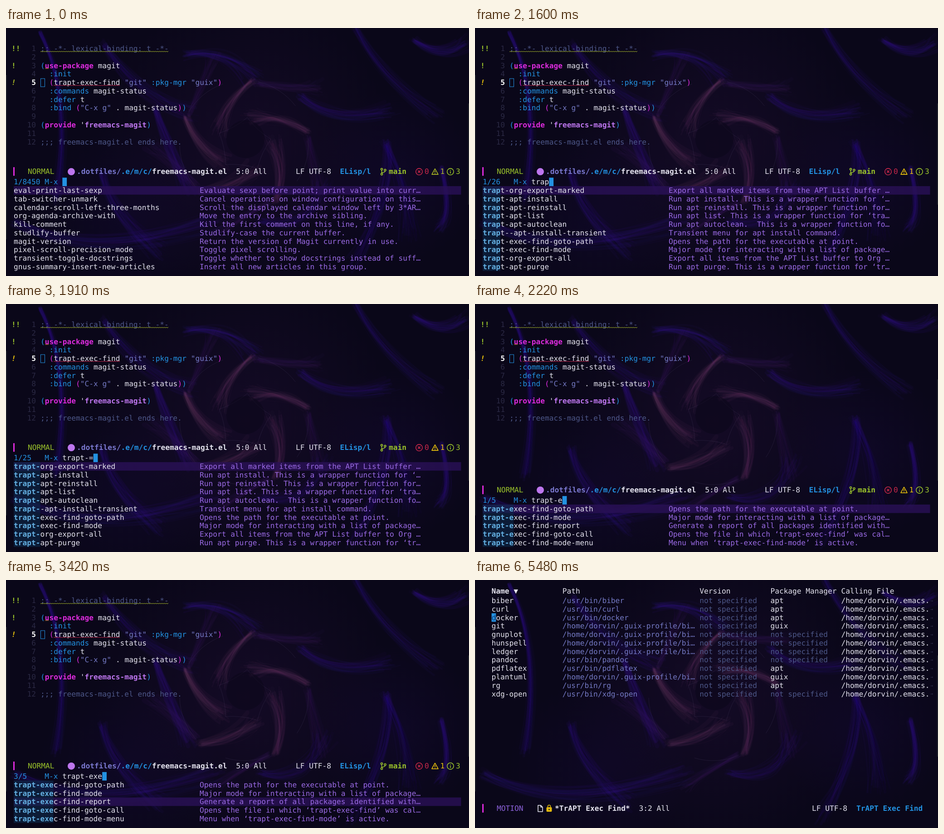
An HTML page with a canvas for the animation above (8000 ms loop, 1021 by 549 pixels).

```html
<!DOCTYPE html>
<html lang="en">
<head>
<meta charset="utf-8">
<title>Package command session</title>
<style>
html, body { margin: 0; width: 100%; height: 100%; overflow: hidden; background: #0a0719; }
canvas, svg { position: absolute; left: 0; top: 0; width: 1021px; height: 549px; }
text { font: 16.21px "DejaVu Sans Mono", monospace; white-space: pre; text-rendering: geometricPrecision; fill: #e4e3ee; }
.bold, .key, .sym, .hit, .dir, .mode, .cur, .mark, .warn { font-weight: bold; }
.blue, .mode, .tail { fill: #2392e2; }
.mode { fill: #2392e2; }
.pink, .key { fill: #dc2bdd; }
.str { fill: #7479c4; }
.dir { fill: #7a78cf; }
.dim { fill: #4d5788; }
.num { fill: #2b2944; }
.cur { fill: #ffffff; }
.sym { fill: #bd76ee; }
.desc { fill: #9a6ae4; }
.hit { fill: #64b0e2; }
.green, .mark { fill: #9cc42b; }
.red { fill: #c9284a; }
.motion { fill: #8d63dc; }
.under { fill: #123c78; }
.arrow { font-size: 10px; fill: #34334f; }
</style>
</head>
<body>
<canvas id="wall" width="1021" height="549"></canvas>
<svg id="screen" viewBox="0 0 1021 549"></svg>
<script>
const COL = 9.76, ROW = 18.77, LOOP = 8000;
const LEFT = 17, CODE = 76, TOP = 45.5;
const screen = document.getElementById('screen');

// ---------- wallpaper: bundles of faint curved strands ----------
function paintWall() {
  const g = document.getElementById('wall').getContext('2d');
  let seed = 11;
  const rnd = () => (seed = (seed * 16807) % 2147483647) / 2147483647;
  const jitter = n => (rnd() + rnd() - 1) * n;

  function glow(x, y, r, rgb, alpha) {
    const grad = g.createRadialGradient(x, y, 0, x, y, r);
    grad.addColorStop(0, `rgba(${rgb},${alpha})`);
    grad.addColorStop(1, `rgba(${rgb},0)`);
    g.fillStyle = grad;
    g.fillRect(0, 0, 1021, 549);
  }

  function bundle(x0, y0, cx, cy, x1, y1, spread, count, rgb) {
    for (let i = 0; i < count; i++) {
      g.strokeStyle = `rgba(${rgb},${0.025 + rnd() * 0.05})`;
      g.lineWidth = 0.8 + rnd() * rnd() * 10;
      g.beginPath();
      g.moveTo(x0 + jitter(spread * .4), y0 + jitter(spread * .4));
      g.quadraticCurveTo(cx + jitter(spread), cy + jitter(spread), x1 + jitter(spread), y1 + jitter(spread));
      g.stroke();
    }
  }

  g.fillStyle = '#0a0719';
  g.fillRect(0, 0, 1021, 549);
  g.lineCap = 'round';
  glow(525, 260, 330, '36,16,58', .38);
  glow(860, 330, 190, '30,10,80', .22);
  glow(270, 420, 200, '30,10,80', .2);

  const violet = '58,24,150', brown = '110,62,104';
  [
    [212, 320, 230, 410, 335, 492, 28],
    [20, 430, 190, 520, 460, 425, 34],
    [75, 10, 150, 150, 110, 380, 14],
    [215, 35, 290, 150, 405, 190, 30],
    [840, 255, 850, 370, 770, 520, 26],
    [835, 255, 890, 350, 890, 460, 28],
    [770, 0, 830, 110, 945, 190, 24],
    [900, 30, 965, 70, 1010, 30, 24],
    [650, 150, 720, 215, 840, 180, 30],
    [560, 430, 670, 450, 700, 345, 34],
    [400, 60, 480, 40, 545, 110, 30],
    [330, 180, 360, 270, 400, 350, 26],
    [960, 310, 985, 410, 955, 440, 18]
  ].forEach(b => bundle(...b, 34, violet));

  const polar = (r, a) => [525 + r * Math.cos(a), 258 + r * Math.sin(a)];
  for (let k = 0; k < 5; k++) {
    const a = k * Math.PI * .4 - 1.45;
    bundle(...polar(142, a), ...polar(105, a - .5), ...polar(62, a - 1.15), 24, 40, brown);
    bundle(...polar(140, a + .1), ...polar(165, a + .6), ...polar(205, a + .8), 24, 24, '72,34,110');
    g.strokeStyle = 'rgba(92,80,120,.22)';
    g.lineWidth = 1;
    g.beginPath();
    g.arc(525, 258, 142, a + .1, a + .8);
    g.stroke();
    g.beginPath();
    g.moveTo(...polar(60, a));
    g.quadraticCurveTo(...polar(42, a + .6), ...polar(60, a + 1.25));
    g.stroke();
  }
  g.fillStyle = 'rgba(10,7,25,.5)';
  g.beginPath();
  g.arc(528, 246, 42, 0, 7);
  g.fill();
}

// ---------- drawing helpers ----------
const rect = (x, y, w, h, attrs) => `<rect x="${x}" y="${y}" width="${w}" height="${h}" ${attrs}/>`;
const text = (x, mid, str, cls = '') => `<text x="${x}" y="${mid + 5.6}" class="${cls}">${str}</text>`;
const block = (x, mid) => rect(x, mid - 9.4, COL, ROW, 'fill="#2392e2"');

// Parts are [text, class] pairs laid out on the character grid.
function line(x, mid, parts) {
  let col = 0;
  return parts.map(([str, cls]) => {
    const out = str.trim() ? text(x + col * COL, mid, str, cls) : '';
    col += str.length;
    return out;
  }).join('');
}

function wave(x0, x1, y, color) {
  let d = `M${x0} ${y}`;
  for (let x = x0 + 2, up = true; x <= x1; x += 2, up = !up) d += `L${x} ${y + (up ? -1.8 : 0)}`;
  return `<path d="${d}" fill="none" stroke="${color}" stroke-width="1"/>`;
}

const edges = rect(0, 104, 2, 364, 'fill="#20212b"') + rect(1019, 167, 2, 224, 'fill="#20212b"');
const bar = mid => rect(16, mid - 9.5, 3, 19, 'fill="#dc2bdd"');
const icon = (x, y, color, body) =>
  `<g transform="translate(${x} ${y})" fill="none" stroke="${color}" stroke-width="1.6">${body}</g>`;

// ---------- code buffer ----------
const source = [
  [[';; -*- lexical-binding: t -*-', 'dim']],
  [],
  [['(', 'blue'], ['use-package', 'key'], [' magit']],
  [['  '], [':init', 'blue']],
  [['  '], ['(', 'pink'], ['trapt-exec-find'], [' '], ['"git"', 'str'], [' '], [':pkg-mgr', 'blue'], [' '], ['"guix"', 'str'], [')', 'pink']],
  [['  '], [':commands', 'blue'], [' magit-status']],
  [['  '], [':defer', 'blue'], [' t']],
  [['  '], [':bind', 'blue'], [' '], ['(', 'pink'], ['"C-x g"', 'str'], [' . magit-status'], [')', 'pink'], [')', 'blue']],
  [],
  [['(', 'blue'], ['provide', 'key'], [" '"], ['freemacs-magit', 'sym'], [')', 'blue']],
  [],
  [[';;; freemacs-magit.el ends here.', 'dim']]
];

function codeBuffer(warn) {
  const rows = source.map((parts, i) => {
    const mid = TOP + i * ROW, n = String(i + 1);
    return text(66 - n.length * COL, mid, n, i === 4 ? 'cur' : 'num') + line(CODE, mid, parts);
  }).join('');
  return rows +
    text(12, TOP, '!!', 'mark') +
    text(12, TOP + 2 * ROW, '!', 'mark') +
    `<text x="12" y="${TOP + 4 * ROW + 5.6}" class="warn" style="font-style:italic;fill:${warn}">!</text>` +
    wave(76, 358, 53, '#a3b32a') + wave(86, 95, 90.5, '#d09a20') + wave(105, 251, 128, '#c9284a') +
    rect(76.5, 112, 9, 18, 'fill="none" stroke="#2392e2"');
}

function codeStatus(mid, warn) {
  return bar(mid) + text(48, mid, 'NORMAL', 'green') +
    `<circle cx="144" cy="${mid + .5}" r="8" fill="#bd76ee"/>` +
    line(156, mid, [['.dotfiles/', 'dir'], ['.e/m/c/', 'mode'], ['freemacs-magit.el', 'bold'], ['  5:0 All']]) +
    text(639, mid, 'LF UTF-8') + text(736.5, mid, 'ELisp/l', 'mode') +
    icon(832, mid, '#9cc42b', '<circle cx="-3.5" cy="-5" r="2"/><circle cx="-3.5" cy="6" r="2"/><circle cx="4" cy="-3" r="2"/><path d="M-3.5 -3V4M4 -1Q4 2 -3.5 3"/>') +
    text(844, mid, 'main', 'green bold') +
    icon(911, mid + .5, '#c9284a', '<circle r="7.2"/><path d="M-2.7 -2.7L2.7 2.7M2.7 -2.7L-2.7 2.7"/>') +
    text(923, mid, '0', 'red') +
    icon(946, mid + .5, warn, '<path d="M0 -6.5L7 6H-7Z" stroke-linejoin="round"/><path d="M0 -2V2M0 3.2V4.6"/>') +
    `<g style="--w:${warn}"><text x="957.5" y="${mid + 5.6}" style="fill:var(--w)">1</text></g>` +
    icon(980, mid + .5, '#9cc42b', '<circle r="7.2"/><path d="M0 -.8V4M0 -3.8V-2"/>') +
    text(992, mid, '3', 'green');
}

// ---------- completion list ----------
const allCommands = [
  ['eval-print-last-sexp', 'Evaluate sexp before point; print value into curr…'],
  ['tab-switcher-unmark', 'Cancel operations on window configuration on this…'],
  ['calendar-scroll-left-three-months', 'Scroll the displayed calendar window left by 3*AR…'],
  ['org-agenda-archive-with', 'Move the entry to the archive sibling.'],
  ['kill-comment', 'Kill the first comment on this line, if any.'],
  ['studlify-buffer', 'Studlify-case the current buffer.'],
  ['magit-version', 'Return the version of Magit currently in use.'],
  ['pixel-scroll-precision-mode', 'Toggle pixel scrolling.'],
  ['transient-toggle-docstrings', 'Toggle whether to show docstrings instead of suff…'],
  ['gnus-summary-insert-new-articles', 'Insert all new articles in this group.']
];
const tCommands = [
  allCommands[1],
  allCommands[8],
  ['toggle-frame-fullscreen', 'Toggle fullscreen state of FRAME.'],
  ['tab-bar-switch-to-next-tab', 'Switch to ARGth next tab.'],
  ['text-scale-adjust', 'Adjust the font size in the current buffer by INC…'],
  ['trapt-org-export-marked', 'Export all marked items from the APT List buffer …'],
  ['transpose-paragraphs', 'Interchange the current paragraph with the next o…'],
  ['tabulated-list-sort', 'Sort Tabulated List entries by the column at poin…'],
  ['tags-query-replace', 'Do ‘query-replace-regexp’ of FROM with TO on all …'],
  ['toggle-truncate-lines', 'Toggle truncating of long lines for the current b…']
];
const findPath = ['trapt-exec-find-goto-path', 'Opens the path for the executable at point.'];
const findMode = ['trapt-exec-find-mode', 'Major mode for interacting with a list of package…'];
const traptCommands = [
  tCommands[5],
  ['trapt-apt-install', 'Run apt install. This is a wrapper function for ‘…'],
  ['trapt-apt-reinstall', 'Run apt reinstall. This is a wrapper function for…'],
  ['trapt-apt-list', 'Run apt list. This is a wrapper function for ‘tra…'],
  ['trapt-apt-autoclean', 'Run apt autoclean.  This is a wrapper function fo…'],
  ['trapt--apt-install-transient', 'Transient menu for apt install command.'],
  findPath,
  findMode,
  ['trapt-org-export-all', 'Export all items from the APT List buffer to Org …'],
  ['trapt-apt-purge', 'Run apt purge. This is a wrapper function for ‘tr…']
];
const findCommands = [
  findPath,
  findMode,
  ['trapt-exec-find-report', 'Generate a report of all packages identified with…'],
  ['trapt-exec-find-goto-call', 'Opens the file in which ‘trapt-exec-find’ was cal…'],
  ['trapt-exec-find-mode-menu', 'Menu when ‘trapt-exec-find-mode’ is active.']
];

function completing({ count, input, hits = input.length, list, pick = 0, warn = '#ecc40c' }) {
  const first = 528.4 - (list.length - 1) * ROW;
  const prompt = first - ROW;
  let out = codeBuffer(warn) + codeStatus(prompt - 23.1, warn) +
    line(LEFT, prompt, [[count.padEnd(7), 'blue'], ['M-x ', 'blue'], [input]]) +
    block(LEFT + (11 + input.length) * COL, prompt) +
    rect(LEFT, first + pick * ROW - 9.4, 986.5, ROW, 'fill="#2a1157" fill-opacity=".8"');
  list.forEach(([name, desc], i) => {
    const mid = first + i * ROW;
    if (hits) out += rect(LEFT, mid - 9.4, hits * COL, ROW, 'fill="#0e2a4c" fill-opacity=".6"');
    out += line(LEFT, mid, [[name.slice(0, hits), 'hit'], [name.slice(hits).padEnd(42 - hits)], [desc, 'desc']]);
  });
  return out;
}

// ---------- package table ----------
const HOME = '/home/dorvin/';
const packages = [
  ['biber', 'apt'], ['curl', 'apt'], ['docker', 'apt'], ['git', 'guix', true],
  ['gnuplot', '', true], ['hunspell', '', true], ['ledger', '', true], ['pandoc', ''],
  ['pdflatex', 'apt'], ['plantuml', 'guix', true], ['rg', 'apt'], ['xdg-open', '']
];

function table({ row, col, place }) {
  const x = LEFT + 2 * COL, none = 'not specified';
  let out = line(x, 24, [['Name ▼'.padEnd(16), 'bold'], ['Path'.padEnd(31)], ['Version'.padEnd(16)], ['Package Manager '], ['Calling File']]);
  out += block(LEFT + col * COL, TOP + row * ROW);
  packages.forEach(([name, manager, guix], i) => {
    const mid = TOP + i * ROW;
    const path = guix ? HOME + '.guix-profile/bi…' : '/usr/bin/' + name;
    const head = i === row && col === 2 ? 1 : 0;
    out += line(x, mid, [
      [name.slice(0, head), 'under'], [name.slice(head).padEnd(16 - head)], [path.padEnd(31), 'str'],
      [none.padEnd(16), 'dim'], [(manager || none).padEnd(16), manager ? '' : 'dim'], [HOME + '.emacs.']
    ]) + `<text x="1004" y="${mid + 3.5}" class="arrow">→</text>`;
  });
  const mid = 505.3;
  return out + bar(mid) + text(48, mid, 'MOTION', 'motion') +
    icon(144, mid + .5, '#e4e3ee', '<path d="M-5 -7H1L5 -3V7H-5ZM1 -7V-3H5" stroke-linejoin="round"/>') +
    icon(163.5, mid + .5, '#e3b90e', '<rect x="-5.2" y="-2" width="10.4" height="8.5" rx="1" fill="#e3b90e"/><path d="M-3 -2V-4.5A3 3 0 0 1 3 -4.5V-2"/><circle cy="2.3" r="1.3" fill="#0a0719" stroke="none"/>') +
    line(176, mid, [['*TrAPT Exec Find*', 'bold'], ['  ' + place + ' All']]) +
    text(743, mid, 'LF UTF-8') + text(841, mid, 'TrAPT Exec Find', 'mode');
}

// ---------- timeline ----------
const steps = [
  [0, completing, { count: '1/8450', input: '', list: allCommands, warn: '#aab824' }],
  [1000, completing, { count: '1/531', input: 't', list: tCommands }],
  [1600, completing, { count: '1/26', input: 'trap', list: traptCommands }],
  [1800, completing, { count: '1/26', input: 'trapt', list: traptCommands }],
  [1910, completing, { count: '1/25', input: 'trapt-=', hits: 6, list: traptCommands }],
  [2220, completing, { count: '1/5', input: 'trapt-e', list: findCommands }],
  [2860, completing, { count: '1/5', input: 'trapt-ex', list: findCommands }],
  [3020, completing, { count: '1/5', input: 'trapt-exe', list: findCommands }],
  [3420, completing, { count: '3/5', input: 'trapt-exe', list: findCommands, pick: 2 }],
  [4930, table, { row: 0, col: 0, place: '1:0' }],
  [5480, table, { row: 2, col: 2, place: '3:2' }]
];

let shown = -1;
const start = performance.now();
function tick() {
  const t = (performance.now() - start) % LOOP;
  const now = steps.findLastIndex(([at]) => at <= t);
  if (now !== shown) {
    const [, draw, state] = steps[now];
    screen.innerHTML = edges + draw(state);
    shown = now;
  }
  requestAnimationFrame(tick);
}

paintWall();
tick();
</script>
</body>
</html>
```
